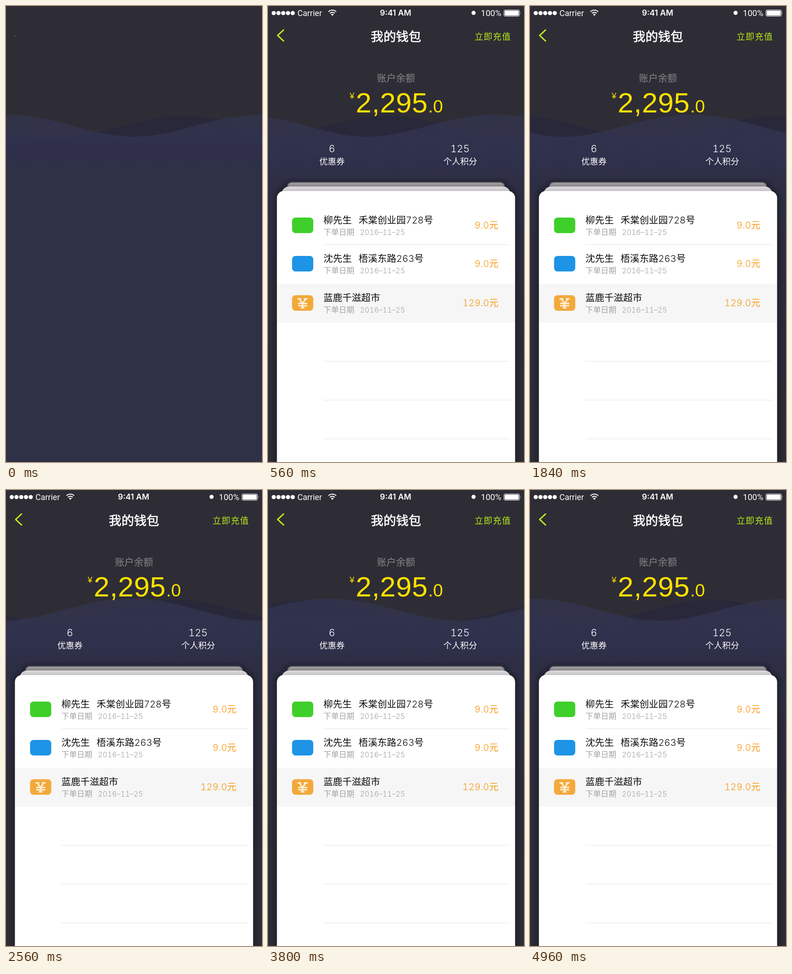
Recreate the animation shown at these times as an HTML page. Size 561 by 998 pixels, loop 5 s.

```html
<!DOCTYPE html>
<html lang="zh-CN">
<head>
<meta charset="utf-8">
<title>我的钱包</title>
<style>
  html, body { margin: 0; width: 100%; height: 100%; overflow: hidden; background: #2e2d35; }
  svg { display: block; width: 561px; height: 998px; }
  text { font-family: "Noto Sans CJK SC", "Noto Sans CJK", sans-serif; font-weight: 300; white-space: pre; }
  .num { font-family: Inter, sans-serif; font-weight: 300; font-variant-numeric: tabular-nums; }
  .bar { font-family: Roboto, sans-serif; font-weight: 400; fill: #fff; }
  .mid { text-anchor: middle; }
  .end { text-anchor: end; }
  .gold { font-family: "Liberation Sans", sans-serif; font-weight: 400; fill: #ffe100; }
  .lime { fill: #b9ea1c; }
  .stat { fill: #fff; font-size: 18.5px; }
  .title { font-size: 27.6px; font-weight: 500; fill: #fff; stroke: #fff; stroke-width: .7px; }
  .name { font-size: 20.7px; fill: #0c0c0c; }
  .name .num { font-size: 20.2px; }
  .sub { font-size: 16.9px; fill: #a2a2a2; }
  .date { font-size: 16px; fill: #a2a2a2; }
  .price { font-size: 20.5px; fill: #f79b1a; }
</style>
</head>
<body>
<svg viewBox="0 0 561 998" xmlns="http://www.w3.org/2000/svg">
  <defs>
    <linearGradient id="backFill" gradientUnits="userSpaceOnUse" x1="0" y1="238" x2="0" y2="998">
      <stop offset="0" stop-color="#29283b"/>
      <stop offset="1" stop-color="#2c2b35"/>
    </linearGradient>
    <linearGradient id="frontFill" gradientUnits="userSpaceOnUse" x1="0" y1="238" x2="0" y2="998">
      <stop offset="0" stop-color="#333550" stop-opacity=".7"/>
      <stop offset=".07" stop-color="#333552" stop-opacity=".75"/>
      <stop offset=".13" stop-color="#2f304b"/>
      <stop offset=".2" stop-color="#2d2e43"/>
      <stop offset=".5" stop-color="#2b2b3a"/>
      <stop offset="1" stop-color="#2d2d36"/>
    </linearGradient>
    <linearGradient id="introFill" gradientUnits="userSpaceOnUse" x1="0" y1="290" x2="0" y2="355">
      <stop offset="0" stop-color="#30314d"/>
      <stop offset=".6" stop-color="#2f2e4b"/>
      <stop offset="1" stop-color="#2f3246"/>
    </linearGradient>
    <linearGradient id="sheetFar" x1="0" y1="0" x2="0" y2="1">
      <stop offset="0" stop-color="#aaa8ab"/>
      <stop offset=".5" stop-color="#807e82"/>
      <stop offset="1" stop-color="#757377"/>
    </linearGradient>
    <linearGradient id="sheetNear" x1="0" y1="0" x2="0" y2="1">
      <stop offset="0" stop-color="#dddbde"/>
      <stop offset="1" stop-color="#bebcbf"/>
    </linearGradient>
    <filter id="soft" x="-10%" y="-10%" width="120%" height="120%"><feGaussianBlur stdDeviation="5"/></filter>
    <filter id="haze" x="-5%" y="-40%" width="110%" height="180%"><feGaussianBlur stdDeviation="1"/></filter>
  </defs>

  <rect width="561" height="998" fill="#2e2d35"/>
  <path id="back" fill="url(#backFill)"/>
  <path id="front" fill="url(#frontFill)"/>

  <g id="intro">
    <rect y="290" width="561" height="708" fill="url(#introFill)"/>
    <rect x="19" y="64.5" width="1.2" height="1.2" fill="#aaa"/>
  </g>

  <g id="ui">
    <g id="dots" fill="#fff"></g>
    <text class="bar" x="64.5" y="21.5" font-size="18">Carrier</text>
    <g fill="none" stroke="#fff" stroke-width="2.1">
      <path d="M132.5 12.6a12 12 0 0 1 17 0"/>
      <path d="M135.7 15.9a7.6 7.6 0 0 1 10.6 0"/>
    </g>
    <path d="M138 18.4a4.4 4.4 0 0 1 6 0l-3 3.2z" fill="#fff"/>
    <text class="bar mid" x="279.5" y="21" font-size="17.5" style="font-family:Inter,sans-serif;font-weight:600">9:41 AM</text>
    <circle cx="450.5" cy="15" r="4.5" fill="#fff"/>
    <text class="bar" x="466.5" y="21.5" font-size="18.5">100%</text>
    <rect x="517" y="8.5" width="34" height="14" rx="2.6" fill="none" stroke="#fff"/>
    <rect x="518.6" y="10.1" width="30.8" height="10.8" rx="1.2" fill="#fff"/>
    <path d="M552.3 12.8q1.8 2.7 0 5.4z" fill="#fff"/>

    <path d="M34 52.5L21.2 64.5L34 76.5" fill="none" stroke="#c3f31e" stroke-width="3" stroke-linecap="round" stroke-linejoin="round"/>
    <text class="title mid" x="280.5" y="77">我的钱包</text>
    <text class="lime" x="452.8" y="73.6" font-size="18.8" letter-spacing="1.2">立即充值</text>

    <text class="mid" x="280.5" y="165" font-size="20.9" fill="#85858b">账户余额</text>
    <text class="gold" x="179" y="203" font-size="18.5">¥</text>
    <text class="gold" x="192.3" y="233.3" font-size="62" letter-spacing=".6">2,295</text>
    <text class="gold" x="351" y="233.3" font-size="39">.0</text>

    <text class="num mid" x="140" y="320" font-size="21.8" fill="#fff">6</text>
    <text class="mid stat" x="140.3" y="346.5">优惠券</text>
    <text class="num mid" x="420.8" y="320" font-size="21.8" fill="#fff">125</text>
    <text class="mid stat" x="421.2" y="346.5">个人积分</text>

    <path d="M17 1020V418q0-14 14-16l14-18h472l14 18q14 2 14 16v602z" fill="#14131c" opacity=".75" filter="url(#soft)"/>
    <rect x="42.5" y="386" width="476" height="20" rx="9" fill="url(#sheetFar)" filter="url(#haze)"/>
    <path d="M30 408q4-13 18-13h465q14 0 18 13z" fill="url(#sheetNear)"/>
    <rect x="19.5" y="405" width="522" height="620" rx="15" fill="#fff"/>
    <rect x="20" y="608" width="521" height="85" fill="#f6f6f6"/>
    <g id="rules" stroke="#e4e4e4"></g>
    <g id="rows"></g>
    <path d="M64.5 641H73M78.5 641H87M68.5 641L75.8 651L83 641M75.8 650V660.5M66 651H86M66 656H86M71.5 660.8H80" fill="none" stroke="#fff0d8" stroke-width="3"/>
  </g>
</svg>
<script>
const LOOP = 5000, W = 561, H = 998, AMP = 24;
const INTRO = 40;
const $ = id => document.getElementById(id);

const rows = [
  { y: 0, color: '#3fcf2b', name: '柳先生', place: '禾棠创业园', no: '728', price: '9.0' },
  { y: 84, color: '#1e94e6', name: '沈先生', place: '梧溪东路', no: '263', price: '9.0' },
  { y: 170, color: '#f2a93a', name: '蓝鹿千滋超市', price: '129.0' }
];

const num = s => `<tspan class="num">${s}</tspan>`;
const address = r => r.place
  ? `<text class="name" x="198.5" y="476">${r.place}${num(r.no)}号</text>` : '';

$('rows').innerHTML = rows.map(r => `
  <g transform="translate(0 ${r.y})">
    <rect x="52.7" y="463" width="46.5" height="34" rx="7.5" fill="${r.color}"/>
    <text class="name" x="121.5" y="476">${r.name}</text>
    ${address(r)}
    <text class="sub" x="121.5" y="501.3">下单日期</text>
    <text class="num date" x="201.5" y="501.3">2016–11–25</text>
    <text class="price end" x="505" y="487.3">${num(r.price)}元</text>
  </g>`).join('');

$('rules').innerHTML = [522.5, 777.5, 862.5, 947.5]
  .map(y => `<path d="M122 ${y}H530"/>`).join('');

$('dots').innerHTML = [0, 1, 2, 3, 4]
  .map(i => `<circle cx="${12.6 + i * 10.4}" cy="15.5" r="4.6"/>`).join('');

// Area below one wave period; skew widens the crest and narrows the trough.
function wave(crest, mid, skew) {
  let d = `M0 ${H}`;
  for (let x = 0; x <= W; x += 5.5) {
    const u = (x - crest) / W * 2 * Math.PI;
    const y = mid - AMP * Math.cos(u - skew * Math.sin(u));
    d += `L${x.toFixed(1)} ${y.toFixed(2)}`;
  }
  return d + `V${H}Z`;
}

function draw(t) {
  const p = t / LOOP;
  $('front').setAttribute('d', wave(-W * p, 262, .06));
  $('back').setAttribute('d', wave(388 - 2 * W * p, 264, 0));
  const opening = t < INTRO;
  $('intro').style.display = opening ? '' : 'none';
  $('ui').style.display = opening ? 'none' : '';
}

const start = performance.now();
function tick() {
  draw((performance.now() - start) % LOOP);
  requestAnimationFrame(tick);
}
draw(0);
requestAnimationFrame(tick);
</script>
</body>
</html>
```
